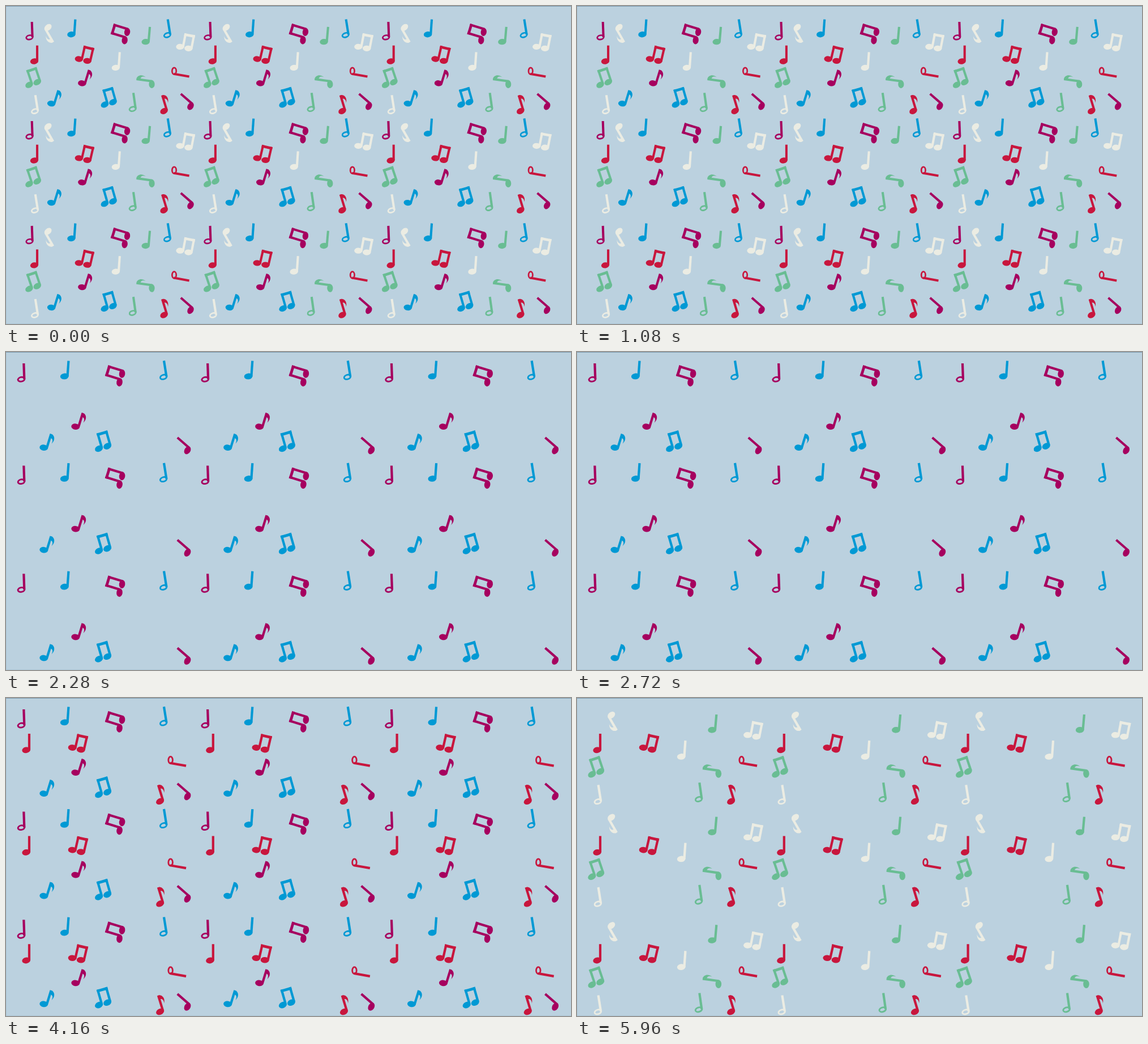
Write an HTML page with a canvas that moves like this. It is 998 by 561 pixels and loops after 6 s.

```html
<!DOCTYPE html>
<html lang="en">
<head>
<meta charset="utf-8">
<title>Music notes</title>
<style>
  html, body { margin: 0; width: 100%; height: 100%; overflow: hidden; background: #bbd1df; }
  canvas { display: block; width: 998px; height: 561px; }
</style>
</head>
<body>
<canvas id="stage" width="998" height="561"></canvas>
<script>
const W = 998, H = 561, LOOP = 6000, BEAM = 15.6;
const ctx = document.getElementById('stage').getContext('2d');
const purple = '#a6005f', blue = '#0099d4', red = '#c8163d', green = '#69bd93', white = '#ebece3';

// kind, colour, foot of the (left) stem, angle in degrees, stem length
const groups = {
  a: [
    ['half', purple, 32.3, 47.2, -2, 27.2],
    ['quarter', blue, 108.6, 42.5, 4, 27],
    ['beam', purple, 201.3, 48, -73, 27],
    ['half', blue, 283.3, 42.5, -9, 27.5],
    ['eighth', purple, 128, 132.5, 17, 26],
    ['eighth', blue, 72, 169.5, 17, 26],
    ['beam', blue, 169, 168.2, -16, 26],
    ['quarter', purple, 323.4, 168.9, -49, 27.3]
  ],
  b: [
    ['quarter', red, 41, 91, 0, 28],
    ['beam', red, 122.4, 88, 13, 25],
    ['half', red, 290.5, 114.8, 100, 28],
    ['eighth', red, 277, 180, -17, 27.5]
  ],
  c: [
    ['eighth', white, 56.5, 33.5, 150, 27],
    ['quarter', green, 244, 56, 5, 27],
    ['beam', white, 306.8, 65.5, 11, 25],
    ['quarter', white, 189.5, 103, 4, 28],
    ['beam', green, 31.2, 132.2, -18.5, 26],
    ['eighth', green, 249.8, 128, -82, 28],
    ['half', white, 42, 181, -9, 28],
    ['half', green, 220.2, 177, -8, 28]
  ]
};

// start time, visible groups, scale of the whole pattern
const states = [
  [0, 'abc', 0.9693],
  [1120, '', 1],
  [2160, 'a', 1],
  [2920, 'c', 1],
  [3720, 'ab', 1],
  [4480, 'ac', 1],
  [5240, 'bc', 1]
];

function head(x, hollow) {
  ctx.beginPath();
  ctx.ellipse(x - 5.3, 0.8, hollow ? 6 : 7.4, hollow ? 3.8 : 5.3, -0.17, 0, Math.PI * 2);
  if (hollow) {
    ctx.lineWidth = 2.8;
    ctx.stroke();
  } else {
    ctx.fill();
  }
}

function stem(x, length) {
  ctx.fillRect(x - 2.1, -length, 4.2, length + 0.5);
}

function flag(length) {
  ctx.save();
  ctx.translate(0, -length);
  ctx.beginPath();
  ctx.moveTo(-1.5, 0);
  ctx.lineTo(2, 0);
  ctx.bezierCurveTo(6, 1, 11, 7, 6, 16);
  ctx.bezierCurveTo(7, 10, 5, 7.5, 1.5, 7);
  ctx.fill();
  ctx.restore();
}

function drawNote([kind, colour, x, y, angle, length]) {
  ctx.save();
  ctx.translate(x, y);
  ctx.rotate(angle * Math.PI / 180);
  ctx.fillStyle = ctx.strokeStyle = colour;
  stem(0, length);
  head(0, kind === 'half');
  if (kind === 'eighth') flag(length);
  if (kind === 'beam') {
    stem(BEAM, length);
    head(BEAM);
    ctx.fillRect(-2.1, -length, BEAM + 4.2, 4.8);
  }
  ctx.restore();
}

function drawPattern(names, scale) {
  ctx.save();
  ctx.translate(W / 2, H / 2);
  ctx.scale(scale, scale);
  ctx.translate(-W / 2, -H / 2);
  for (const dy of [0, 180.5, 371.2]) {
    for (let col = 0; col < 3; col++) {
      ctx.save();
      ctx.translate(col * 324.8, dy);
      for (const name of names) groups[name].forEach(drawNote);
      ctx.restore();
    }
  }
  ctx.restore();
}

function drawStage() {
  ctx.fillStyle = '#bbd1df';
  ctx.fillRect(0, 0, W, H);
  ctx.fillStyle = '#adc6d5';
  ctx.fillRect(0, 0, 1, H);
  ctx.fillRect(0, H - 1, W, 1);
  ctx.fillStyle = '#7c9ab0';
  ctx.fillRect(0, 0, W, 1);
}

const start = performance.now();
let shown;

function frame(now) {
  const t = Math.max(0, now - start) % LOOP;
  const state = states.findLast(s => s[0] <= t);
  if (state !== shown) {
    shown = state;
    drawStage();
    drawPattern(state[1], state[2]);
  }
  requestAnimationFrame(frame);
}

frame(start);
</script>
</body>
</html>
```
